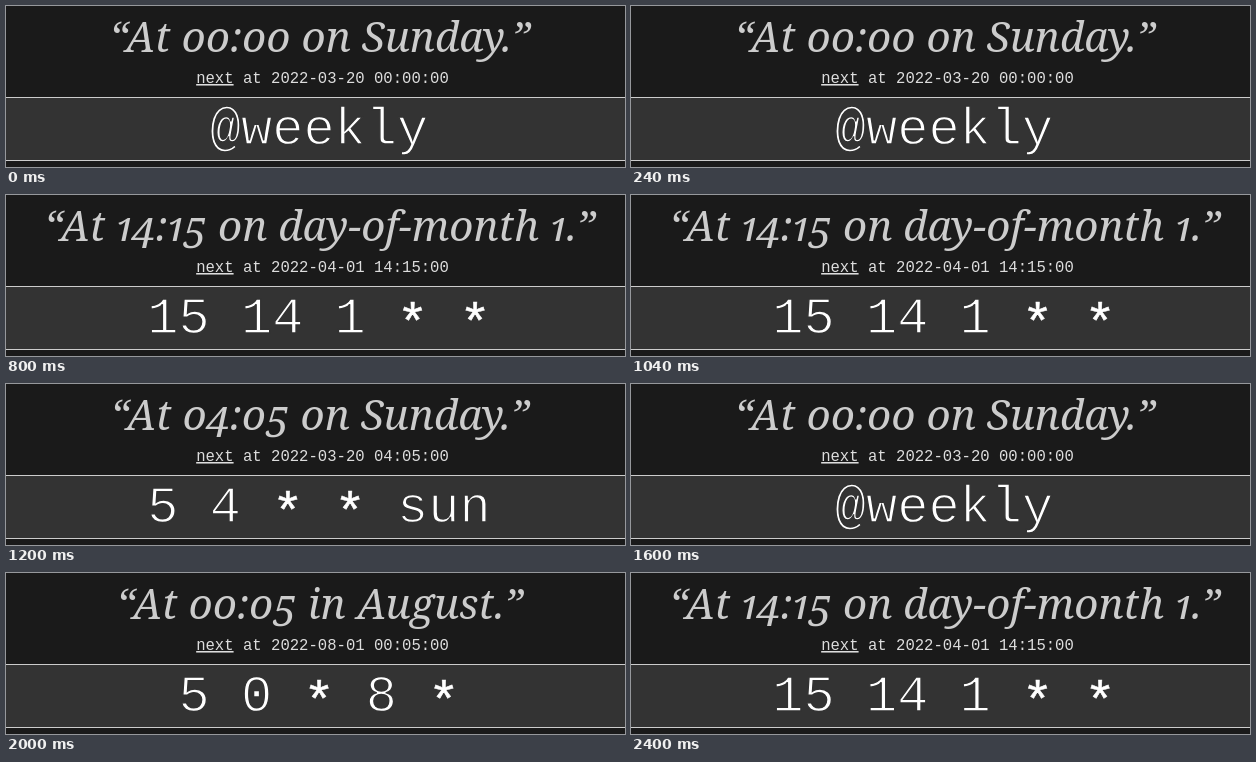
Write an HTML page that moves like this. It is 619x161 px and loops after 2800 ms.

```html
<!DOCTYPE html>
<html lang="en">
<head>
<meta charset="utf-8">
<title>Cron schedule examples</title>
<style>
  html, body { margin: 0; width: 100%; height: 100%; overflow: hidden; background: #1a1a1a; }
  svg { display: block; width: 619px; height: 161px; }
  text { text-anchor: middle; white-space: pre; }
  .title {
    font: italic 42px "Noto Serif", serif;
    font-variant-numeric: oldstyle-nums proportional-nums;
    fill: #ccc;
  }
  .next { font: 15.6px "Liberation Mono", monospace; fill: #ddd; }
  .link { text-decoration: underline 1px; text-underline-offset: 1px; }
  /* A band-coloured outline thins the strokes. */
  .cron { font: 52px "Liberation Mono", monospace; fill: #fff; stroke: #333; stroke-width: 1.4px; }
  .star { baseline-shift: -7px; stroke: #fff; stroke-width: .6px; }
  .slide { visibility: hidden; animation: twice 2.8s step-end infinite; }
  .slide:nth-child(2) { animation-delay: -2.4s; }
  .slide:nth-child(3) { animation-delay: -2s; }
  .slide:nth-child(4) { animation-name: once; animation-delay: -1.6s; }
  @keyframes twice {
    0%, 57.1428% { visibility: visible; }
    14.2857%, 71.4285%, 100% { visibility: hidden; }
  }
  @keyframes once {
    0% { visibility: visible; }
    14.2857%, 100% { visibility: hidden; }
  }
</style>
</head>
<body>
<svg viewBox="0 0 619 161">
  <rect y="91" width="619" height="64" fill="#ccc"/>
  <rect y="92" width="619" height="62" fill="#333"/>
  <g id="slides"></g>
</svg>
<script>
  const schedules = [
    ["At 00:00 on Sunday.", "2022-03-20 00:00:00", "@weekly"],
    ["At 00:05 in August.", "2022-08-01 00:05:00", "5 0 * 8 *"],
    ["At 14:15 on day-of-month 1.", "2022-04-01 14:15:00", "15 14 1 * *"],
    ["At 04:05 on Sunday.", "2022-03-20 04:05:00", "5 4 * * sun"],
  ];
  const lowerStars = cron => cron.replaceAll("*", '<tspan class="star">*</tspan>');

  document.getElementById("slides").innerHTML = schedules.map(([title, date, cron]) => `<g class="slide">
    <text class="title" x="314" y="46">“${title}”</text>
    <text class="next" x="316.5" y="77"><tspan class="link">next</tspan> at ${date}</text>
    <text class="cron" x="313" y="138">${lowerStars(cron)}</text>
  </g>`).join("");
</script>
</body>
</html>
```
